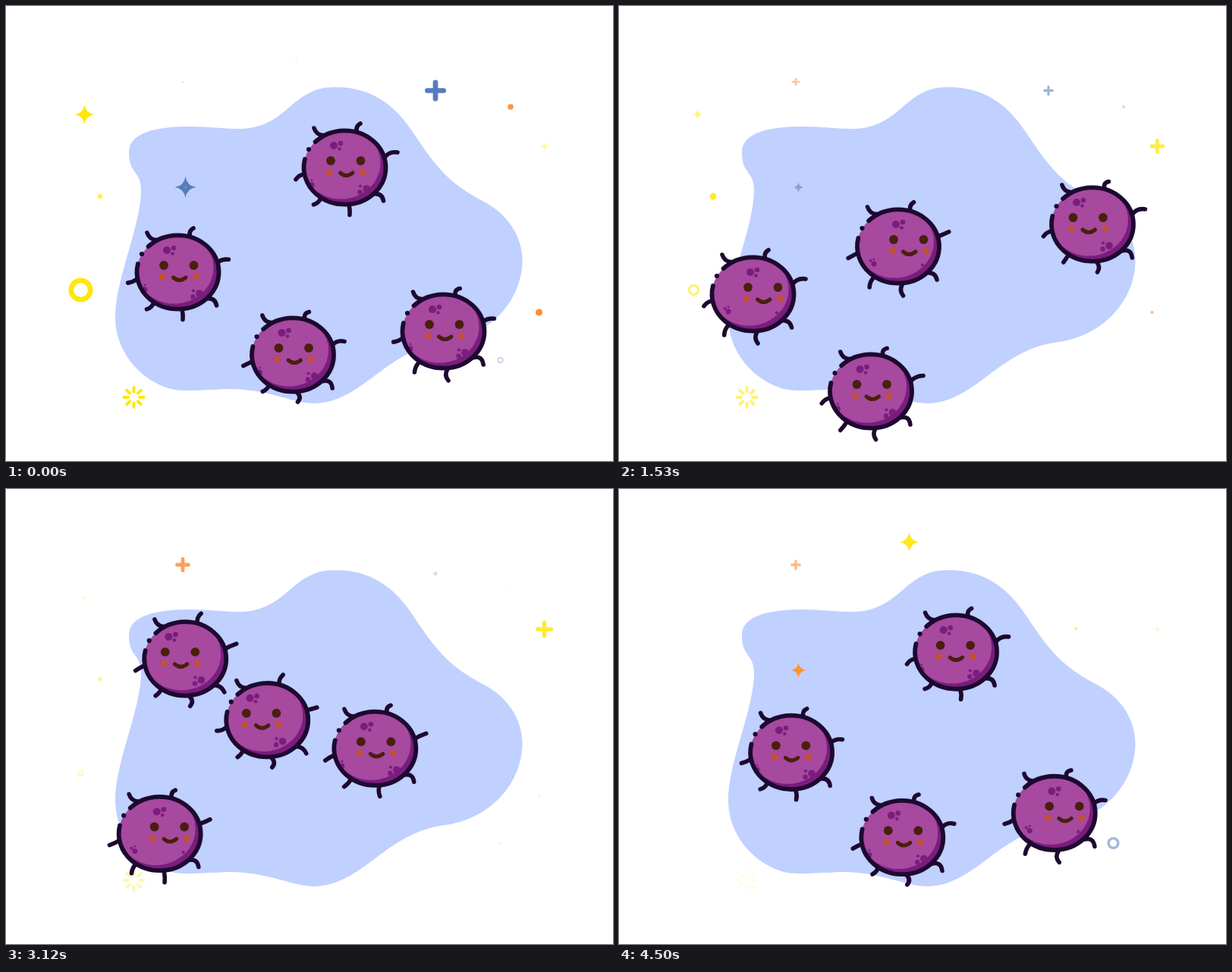
Animation, 800 px wide and 600 px high, one loop 4530 ms. Source, as an HTML page with a canvas:

```html
<!DOCTYPE html>
<html>
<head>
<meta charset="utf-8">
<style>
  html, body { margin: 0; width: 100%; height: 100%; overflow: hidden; background: #fff; }
  canvas { display: block; }
</style>
</head>
<body>
<canvas id="stage" width="800" height="600"></canvas>
<script>
const ctx = document.getElementById('stage').getContext('2d');
const LOOP = 4530, STEP = 30, TAU = Math.PI * 2;
const INK = '#1d0930', LIGHT = '#a6499f', DARK = '#7a1d7d', BROWN = '#4a1f0d', CHEEK = '#c4512d';
const YELLOW = '#ffe60a', ORANGE = '#ff7f1f', BLUE = '#557dbb';

const blob = new Path2D(`M162 193C162 166 200 159 242 159C270 159 285 162 308 162
  C372 161 375 107 433 107C490 107 518 137 544 178C572 220 592 238 628 257
  C660 273 681 303 680.500 337C679 392 635 435 580 443C500 452 470 524 405 524
  C370 522 350 506 295 505C262 506 250 508 226 506.500C190 502 144 465 144 410
  C144 360 178 290 178 243C178 217 162 222 162 193Z`);

// shape, x, y, size, colour, time of first peak, optional time of rest
const sparkles = [
  ['star', 103.5, 143, 13, YELLOW, 0],
  ['star', 382.5, 70, 14, YELLOW, 610, 4310],
  ['star', 236.5, 239, 14, BLUE, 0],
  ['star', 236.5, 239, 14, YELLOW, 620],
  ['star', 236.5, 239, 14, ORANGE, 990],
  ['plus', 233, 100, 14, ORANGE, 1140],
  ['plus', 566, 111.5, 14, BLUE, 0],
  ['plus', 709.5, 185, 14, YELLOW, 1380],
  ['dot', 124, 251, 5.5, YELLOW, 1620],
  ['dot', 602.5, 184, 3.5, YELLOW, 610],
  ['dot', 665, 133, 4.9, ORANGE, 110],
  ['dot', 702.5, 404, 5.2, ORANGE, 60],
  ['ring', 98.5, 374.5, 16, YELLOW, 0],
  ['ring', 651.5, 467, 17, BLUE, 530],
  ['burst', 168.5, 516, 15, YELLOW, 0]
];

// path: closed route through a few points, passed at pathTimes
// lag: phase offset per leg rhythm; glances: [time, sideways turn of the face]
const pathTimes = [0, 660, 1530, 2130, 2760, 3480, LOOP];
const viruses = [
  { path: [[446.5, 213], [413.5, 257], [368, 317], [341, 341.5], [335, 321], [362, 285]],
    lag: [0, 0, 0], glances: [[1100, 12.5], [3650, -9]], blinks: [] },
  { path: [[226.5, 351], [206, 365], [176.5, 380], [184.5, 331], [218, 248.5], [247, 224]],
    lag: [0, .3, 0], glances: [[1450, 12], [3650, -8]], blinks: [585, 3550] },
  { path: [[378, 460], [361.5, 483], [332, 508], [284.5, 501], [215.5, 472.5], [215.5, 443]],
    lag: [-.1, .2, -.2], glances: [[2850, 11.5]], blinks: [] },
  { path: [[576.5, 429], [597.5, 370], [624, 288], [584.5, 267], [511.5, 308.5], [481.5, 374]],
    lag: [-.12, .3, .33], glances: [[1350, -7], [4700, 12]], blinks: [660, 3520] }
];

// Each tip circles its rest point, while the leg bends to its left by mean + cos + sin parts.
const rhythms = [LOOP / 3, LOOP / 5, LOOP / 4];
const legs = [
  { rhythm: 0, angle: -73, tip: [25, -61.5], swing: [-4.5, 5], bend: [3, 1.2, -2.2] },
  { rhythm: 0, angle: 44, tip: [57, 44], swing: [-6, 0], bend: [4, 3, -5] },
  { rhythm: 0, angle: -122, tip: [-38.5, -52], swing: [-2, 0], bend: [5, 0, 0] },
  { rhythm: 1, angle: -15, tip: [67.5, -18.5], swing: [2, -2], bend: [2.5, 3.5, 1.5] },
  { rhythm: 1, angle: 170, tip: [-65.5, 15], swing: [1, 1], bend: [0, -3, 1] },
  { rhythm: 2, angle: 84, tip: [6.5, 63.5], swing: [0, -1.5], bend: [0, 1, -6] },
  { rhythm: 2, angle: 126, tip: [-39, 51], swing: [-2, -3], bend: [0, 3, -1.5] }
];

// three groups of a large, a medium and a small spot
const spots = [
  [-14.5, -29, 5], [-5.5, -32, 3.3], [-7, -24.5, 2.3],
  [28.5, 28, 4.8], [20, 32.5, 3.2], [20.5, 24.5, 2.1],
  [-43.5, 23, 3.5], [-48, 19, 2], [-43.5, 17, 1.4]
];

const smooth = u => { u = Math.min(1, Math.max(0, u)); return u * u * (3 - 2 * u); };

// Cubic spline through the route, with a sharp turn where it closes.
function along(path, t) {
  const points = [...path, path[0]], last = points.length - 1;
  let i = 0;
  while (t >= pathTimes[i + 1]) i++;
  const span = pathTimes[i + 1] - pathTimes[i], u = (t - pathTimes[i]) / span;
  return [0, 1].map(axis => {
    const slope = k => {
      const a = Math.max(k - 1, 0), b = Math.min(k + 1, last);
      return (points[b][axis] - points[a][axis]) / (pathTimes[b] - pathTimes[a]) * span;
    };
    const from = points[i][axis], to = points[i + 1][axis];
    return from + (to - from) * smooth(u)
      + u * (1 - u) * ((1 - u) * slope(i) - u * slope(i + 1));
  });
}

function glow(t, peak) {
  const period = 1830, phase = (t - peak + period) % period;
  const away = Math.min(phase, period - phase);
  return Math.max(0, 1.2 * Math.exp(-away / 540) - .2);
}

function oval(x, y, rx, ry, color) {
  ctx.fillStyle = color;
  ctx.beginPath();
  ctx.ellipse(x, y, rx, ry, 0, 0, TAU);
  ctx.fill();
}

function strokeLine(width, color, trace) {
  ctx.lineWidth = width;
  ctx.strokeStyle = color;
  ctx.beginPath();
  trace();
  ctx.stroke();
}

function spokes(count, inner, outer) {
  for (let i = 0; i < count; i++) {
    const c = Math.cos(i * TAU / count), s = Math.sin(i * TAU / count);
    ctx.moveTo(c * inner, s * inner);
    ctx.lineTo(c * outer, s * outer);
  }
}

const shapes = {
  star(r, color) {
    const c = r * .13;
    ctx.fillStyle = color;
    ctx.beginPath();
    ctx.moveTo(0, -r);
    ctx.quadraticCurveTo(c, -c, r, 0);
    ctx.quadraticCurveTo(c, c, 0, r);
    ctx.quadraticCurveTo(-c, c, -r, 0);
    ctx.quadraticCurveTo(-c, -c, 0, -r);
    ctx.fill();
  },
  plus(r, color) { strokeLine(r * .48, color, () => spokes(4, 0, r * .76)); },
  dot(r, color) { oval(0, 0, r, r, color); },
  ring(r, color) { strokeLine(r * .42, color, () => ctx.arc(0, 0, r * .79, 0, TAU)); },
  burst(r, color) { strokeLine(3.9, color, () => spokes(8, r * .5, r * .87)); }
};

function drawSparkle([shape, x, y, size, color, peak, rest = LOOP], t) {
  const level = glow(Math.min(t, rest), peak);
  ctx.save();
  ctx.translate(x, y);
  ctx.globalAlpha = level ** .8;
  shapes[shape](shape === 'burst' ? size : size * level, color);
  ctx.restore();
}

function drawLeg({ rhythm, angle, tip, swing, bend }, lag, t) {
  const phase = (t / rhythms[rhythm] + lag[rhythm]) * TAU, a = angle / 360 * TAU;
  const x0 = 54 * Math.cos(a), y0 = 50 * Math.sin(a);
  const x1 = tip[0] + swing[0] * Math.cos(phase);
  const y1 = tip[1] + swing[1] * Math.cos(phase + TAU / 8);
  const dx = x1 - x0, dy = y1 - y0;
  const push = (bend[0] + bend[1] * Math.cos(phase) + bend[2] * Math.sin(phase)) / Math.hypot(dx, dy);
  strokeLine(5.6, INK, () => {
    ctx.moveTo(x0, y0);
    ctx.quadraticCurveTo(x0 + dx / 2 + dy * push, y0 + dy / 2 - dx * push, x1, y1);
  });
}

function drawBody(look) {
  ctx.save();
  ctx.beginPath();
  ctx.ellipse(0, 0, 54, 48.5, 0, 0, TAU);
  ctx.clip();
  oval(0, 0, 54, 49, DARK);
  oval(-5, -6, 52, 47.5, LIGHT);
  spots.forEach(([x, y, r]) => oval(x + look * .92, y, r, r, DARK));
  ctx.restore();

  // the outline leaves a gap at the upper left, with one dot inside
  strokeLine(5.8, INK, () => ctx.ellipse(0, 0, 54, 48.7, 0, TAU * .622, TAU * 1.536));
  oval(-47.5, -24, 3.1, 3.1, INK);
}

function drawFace(lid) {
  for (const side of [-1, 1]) {
    oval(1.25 + side * 19.75, -9, 5.9, 5.9 * lid, BROWN);
    oval(1.75 + side * 22.25, 6, 4.2, 4.2, CHEEK);
  }
  strokeLine(5, BROWN, () => {
    ctx.moveTo(-6, 7);
    ctx.quadraticCurveTo(2, 14, 10.5, 7);
  });
}

function drawVirus({ path, lag, glances, blinks }, t) {
  const look = glances.reduce(
    (sum, [time, turn]) => sum + turn * smooth(2 - Math.abs(t - time) / 500), 0);
  const lid = Math.min(1, ...blinks.map(time => Math.max(.17, Math.abs(t - time) / 95)));
  ctx.save();
  ctx.translate(...along(path, t));
  legs.forEach(leg => drawLeg(leg, lag, t));
  drawBody(look);
  ctx.translate(look, 0);
  drawFace(lid);
  ctx.restore();
}

function draw(now) {
  const t = Math.floor(now % LOOP / STEP) * STEP;
  ctx.fillStyle = '#fff';
  ctx.fillRect(0, 0, 800, 600);
  ctx.fillStyle = '#c0d0ff';
  ctx.fill(blob);
  ctx.lineCap = ctx.lineJoin = 'round';
  sparkles.forEach(s => drawSparkle(s, t));
  viruses.forEach(v => drawVirus(v, t));
}

const start = performance.now();
function tick() {
  draw(performance.now() - start);
  requestAnimationFrame(tick);
}
tick();
</script>
</body>
</html>
```
